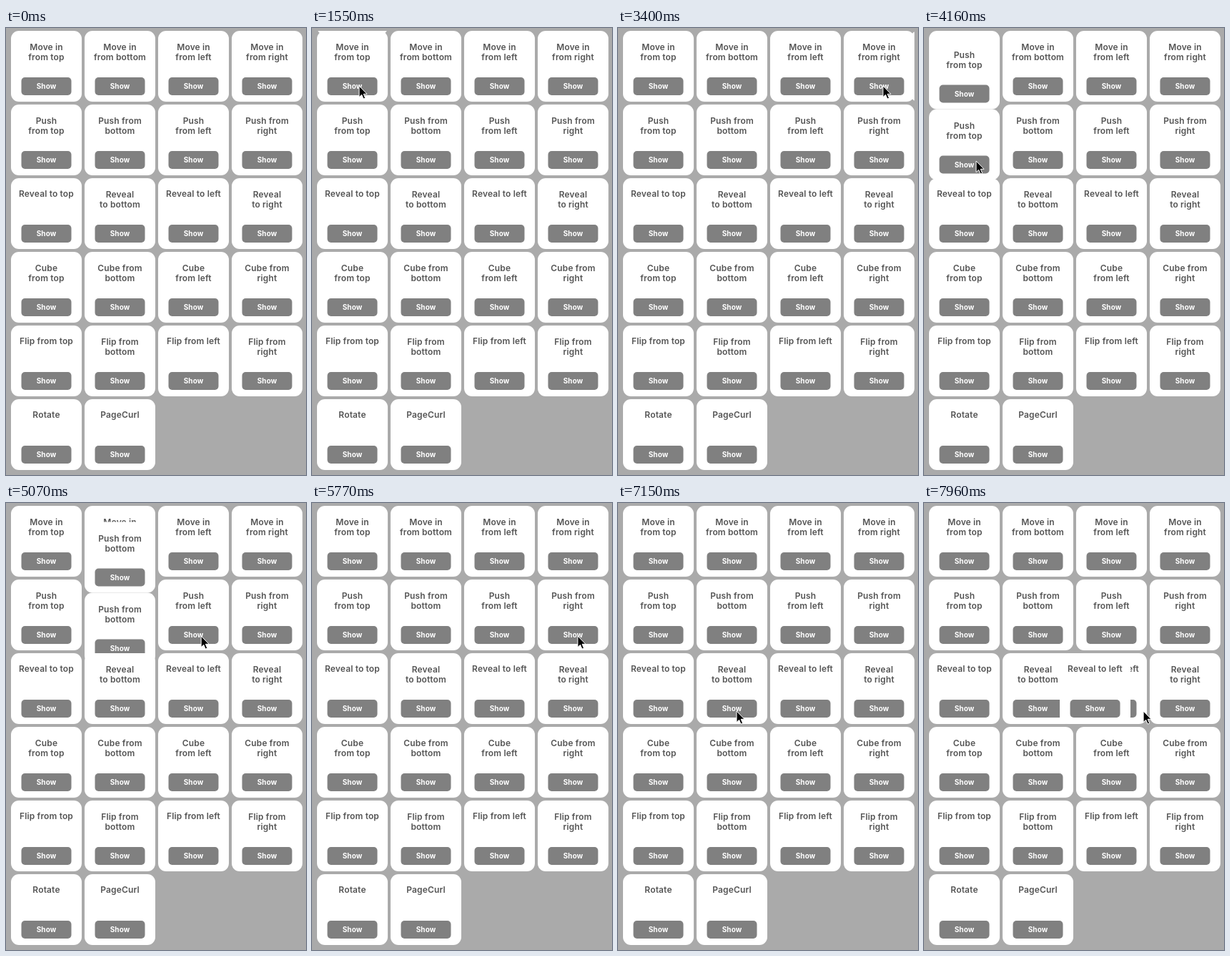
These frames come from a looping animation (420x625 px, 8 s). An HTML page:

```html
<!DOCTYPE html>
<html lang="en">
<head>
<meta charset="utf-8">
<title>Transitions</title>
<style>
  html, body { margin: 0; width: 100%; height: 100%; overflow: hidden; background: #aaa; }
  #grid { position: absolute; left: 7px; top: 4px; width: 408px; height: 621px; overflow: hidden; }
  .slot { position: absolute; }
  .card {
    position: absolute; width: 99px; height: 99px; border-radius: 11px; background: #fff;
    color: #555; text-align: center; font: 600 12px/14px Inter, sans-serif; letter-spacing: .15px;
  }
  .title { position: absolute; top: 16px; width: 100%; white-space: pre; }
  .single { top: 15px; }
  .button {
    position: absolute; left: 15px; top: 65px; width: 70px; height: 25px; border-radius: 5px;
    transform: translateX(-.5px);
    background: #808080; color: #fff; font: 700 10px/25px Inter, sans-serif; letter-spacing: .1px;
  }
  #cursor { position: absolute; left: 0; top: 0; overflow: visible; }
</style>
</head>
<body>
<div id="grid"></div>
<svg id="cursor" width="12" height="19">
  <path d="M0 0V15.6L3.6 12.3 6 18 8.6 16.9 6.2 11.3H11Z" stroke="#fff" stroke-linejoin="round"/>
</svg>
<script>
const LOOP = 8000, DURATION = 300, SIZE = 99, PITCH = 103;
const ENTER = 775;    // the cursor comes in from the left edge
const SETTLE = 210;   // it rests this long on a button before its card moves

const effects = ['Move in', 'Push', 'Reveal', 'Cube', 'Flip'];
const sides = ['top', 'bottom', 'left', 'right'];
const directions = [[0, -1], [0, 1], [-1, 0], [1, 0]];

// One click per card in order: start of its transition, time until the cursor leaves, cursor x in the column
const clicks = [
  [1500, 240, 66], [2201, 200, 60], [2780, 240, 66], [3350, 70, 62],
  [4107, 220, 73], [4861, -15, 63], [5310, 250, 70], [5950, 190, 63],
  [6650, 260, 68], [7290, 50, 63], [7861, 20, 56], [8268, 0, 61]
];

// Ease-in-out: cubic Bézier (.42, 0, .58, 1)
function ease(x) {
  if (x <= 0) return 0;
  if (x >= 1) return 1;
  let lo = 0, hi = 1, s;
  for (let i = 0; i < 20; i++) {
    s = (lo + hi) / 2;
    const at = 3 * s * (1 - s) * (.42 * (1 - s) + .58 * s) + s ** 3;
    if (at < x) lo = s; else hi = s;
  }
  return s * s * (3 - 2 * s);
}

// Short first lines carry one word; "bottom" and "right" wrap after "from"
function titleOf(effect, side) {
  const long = side === 'bottom' || side === 'right';
  if (effect === 'Reveal') return `Reveal${long ? '\n' : ' '}to ${side}`;
  if (effect === 'Move in') return `Move in\nfrom ${side}`;
  if (long) return `${effect} from\n${side}`;
  return `${effect}${effect === 'Flip' ? ' ' : '\n'}from ${side}`;
}

function add(parent, className, text = '') {
  const el = document.createElement('div');
  el.className = className;
  el.textContent = text;
  return parent.appendChild(el);
}

function addCard(slot, title) {
  const card = add(slot, 'card');
  add(card, title.includes('\n') ? 'title' : 'title single', title);
  add(card, 'button', 'Show');
  return card;
}

function place(el, x, y) {
  el.style.transform = `translate(${x}px, ${y}px)`;
}

const grid = document.getElementById('grid');
const cursor = document.getElementById('cursor');
const titles = effects.flatMap(effect => sides.map(side => titleOf(effect, side)));
titles.push('Rotate', 'PageCurl');

const slots = titles.map((title, i) => {
  const slot = add(grid, 'slot');
  slot.style.left = i % 4 * PITCH + 'px';
  slot.style.top = Math.floor(i / 4) * PITCH + 'px';
  return { base: addCard(slot, title), mover: i < clicks.length && addCard(slot, title) };
});

function drawCard(i, t) {
  const { base, mover } = slots[i];
  const x = (t - clicks[i][0]) / DURATION;
  const active = x > 0 && x < 1;
  mover.style.display = active ? '' : 'none';
  const p = active ? ease(x) : 0;
  const effect = effects[Math.floor(i / 4)];
  const [dx, dy] = directions[i % 4];
  const shift = SIZE * (effect === 'Reveal' ? p : 1 - p);
  const pushed = effect === 'Push' ? -SIZE * p : 0;
  place(mover, dx * shift, dy * shift);
  place(base, dx * pushed, dy * pushed);
}

// Glide from button to button, ahead of each click
function drawCursor(t) {
  cursor.style.display = t < ENTER ? 'none' : '';
  let x = 0, y = 87, leave = ENTER;
  clicks.forEach(([start, hold, offset], i) => {
    const arrive = i ? start - SETTLE : ENTER + 235;
    const p = ease((t - leave) / (arrive - leave));
    x += (i % 4 * PITCH + offset - x) * p;
    y += (Math.floor(i / 4) * 105 + 81 - y) * p;
    leave = start + hold;
  });
  place(cursor, x, y);
}

function frame() {
  const t = performance.now() % LOOP;
  clicks.forEach((_, i) => drawCard(i, t));
  drawCursor(t);
  requestAnimationFrame(frame);
}
frame();
</script>
</body>
</html>
```
